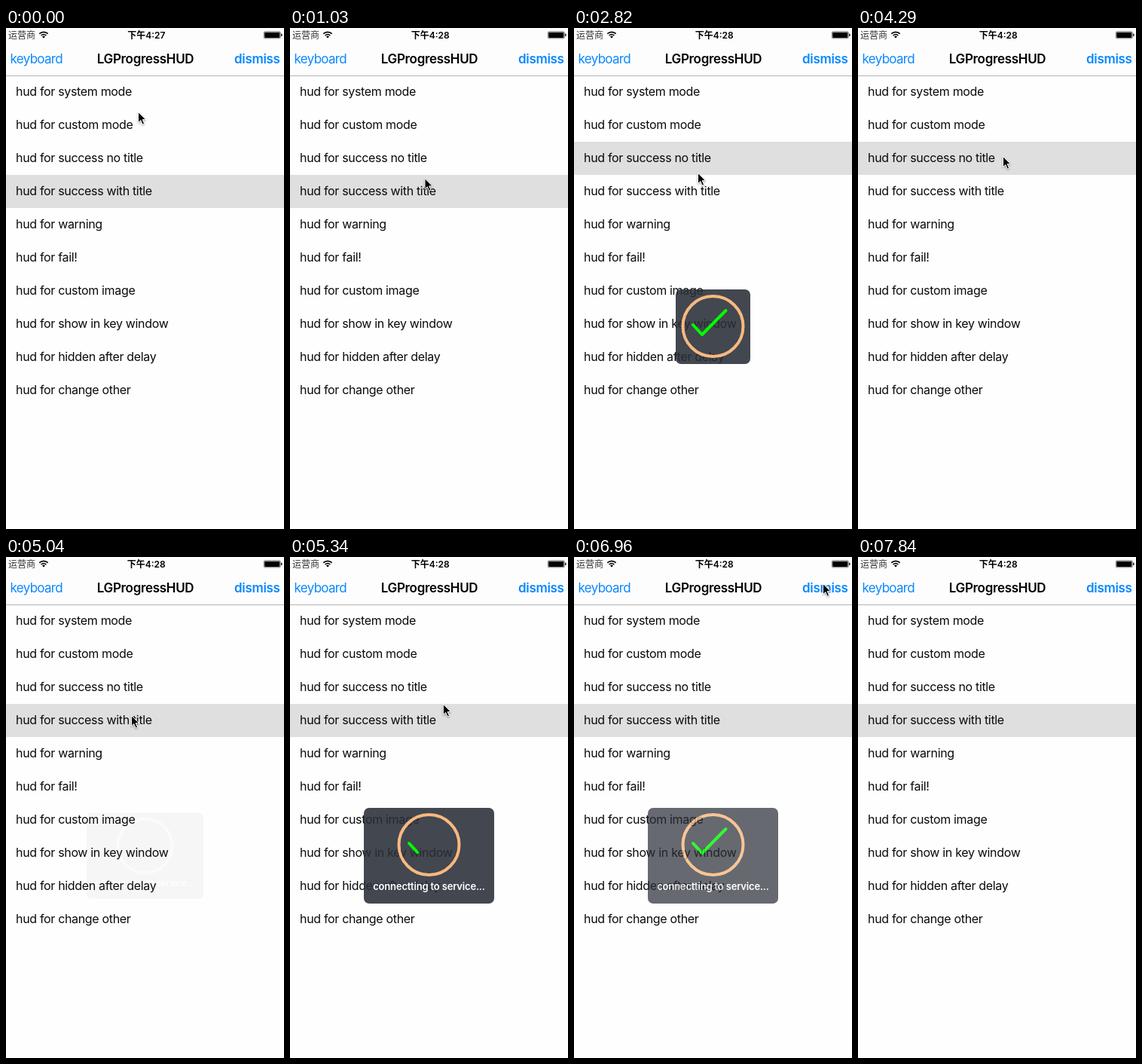
Recreate the animation shown at these times as an HTML page. Size 369 by 665 pixels, loop 7.94 s.

```html
<!DOCTYPE html>
<html lang="zh">
<head>
<meta charset="utf-8">
<title>LGProgressHUD</title>
<style>
  html, body { margin: 0; width: 100%; height: 100%; overflow: hidden; background: #fefefe; }
  svg { display: block; width: 369px; height: 665px; }
  text { font-family: Inter, "Noto Sans CJK SC", "Noto Sans CJK", sans-serif; white-space: pre; }
  .row { font-size: 16px; letter-spacing: -.33px; fill: #0a0a0a; }
  .carrier { font-size: 12px; fill: #333; }
  .clock { font-size: 12px; font-weight: 600; text-anchor: middle; }
  .title { font-size: 17px; font-weight: 600; letter-spacing: -.32px; text-anchor: middle; }
  .link { font-size: 17px; letter-spacing: -.7px; fill: #0b88ff; }
  .bold { font-weight: 600; letter-spacing: -.35px; text-anchor: end; }
  .note { font-size: 13px; font-weight: 600; letter-spacing: -.18px; fill: #fff; text-anchor: middle; }
</style>
</head>
<body>
<svg viewBox="0 0 369 665">
  <rect width="369" height="63" fill="#fdfdfd"/>
  <rect y="63" width="369" height="1" fill="#b4b4b4"/>
  <text class="carrier" x="3" y="13.5">运营商</text>
  <g fill="none" stroke="#000" stroke-width="1.7">
    <path d="M44.3 7.6a8.2 8.2 0 0 1 11.4 0M46.6 10a5 5 0 0 1 6.8 0"/>
    <path d="M50 13.6l-2-2.2a3 3 0 0 1 4 0z" fill="#000" stroke="none"/>
  </g>
  <text class="clock" id="clock" x="186.3" y="13.5"></text>
  <rect x="342.3" y="4.8" width="22" height="9" rx="1.5" fill="none" stroke="#000" stroke-width=".5"/>
  <rect x="343.2" y="5.7" width="20.2" height="7.2" rx=".8"/>
  <rect x="365" y="7.5" width="1.6" height="3.5" rx=".8" fill="#222"/>
  <text class="link" x="5.6" y="47">keyboard</text>
  <text class="title" x="185" y="47">LGProgressHUD</text>
  <text class="link bold" x="363.5" y="47">dismiss</text>

  <rect id="pick" width="369" height="44" fill="#dfdfdf"/>
  <g id="rows"></g>

  <g id="hud">
    <rect id="panel" rx="7" fill="#2a2e37" fill-opacity=".88"/>
    <g id="mark" fill="none" stroke-width="4">
      <circle r="40" stroke="#f7b97f"/>
      <path id="check" d="M-26.5-2L-14.5 11L17-21" pathLength="1" stroke="#0f0"
        stroke-linecap="round" stroke-linejoin="round"/>
    </g>
    <text class="note" id="note" y="45">connectting to service...</text>
  </g>

  <path id="cursor" d="M.5.5V14.6L3.8 11.5L6.2 17L8.6 16L6.2 10.6H10.7Z" stroke="#fff"
    style="filter:drop-shadow(0 1px 1px #0006)"/>
</svg>
<script>
const LOOP = 7940, STEP = 148;
const $ = id => document.getElementById(id);
const set = (id, attrs) => { for (const k in attrs) $(id).setAttribute(k, attrs[k]); };
const clamp = v => Math.min(1, Math.max(0, v));
const smooth = v => { v = clamp(v); return v * v * (3 - 2 * v); };

const modes = ['system mode', 'custom mode', 'success no title', 'success with title', 'warning', 'fail!',
  'custom image', 'show in key window', 'hidden after delay', 'change other'];
$('rows').innerHTML = modes.map((m, i) => `<text class="row" x="13" y="${90 + 44 * i}">hud for ${m}</text>`).join('');

// Pointer stops: [step, x, y]
const stops = [[0, 175, 111], [5, 180, 209], [9, 174, 170], [18, 174, 170], [19, 164, 192], [20, 164, 192],
  [25, 350, 34], [29, 192, 170], [34, 166, 210], [41, 295, 157], [43, 337, 26], [47, 330, 35], [53, 350, 690]];

function pointer(step) {
  const i = Math.max(1, stops.findIndex(s => s[0] >= step));
  const [t0, x0, y0] = stops[i - 1], [t1, x1, y1] = stops[i];
  const u = (step - t0) / (t1 - t0);
  return [x0 + (x1 - x0) * u, y0 + (y1 - y0) * u];
}

const plain = { from: 1560, hide: 3650, w: 99, h: 99, markY: -.5 };
const titled = { from: 5022, hide: 6900, w: 173, h: 127, markY: -14.5, note: true };

// Swings from small to large, then settles at full size
const pop = age => age < 255 ? 1 - .105 * Math.cos(Math.PI * age / 170) : 1;

function drawHud(t) {
  const s = [plain, titled].find(s => t >= s.from && t < s.hide + 300);
  $('hud').style.display = s ? '' : 'none';
  if (!s) return;
  const age = t - s.from, drawn = clamp((age - 150) / 600);
  set('hud', {
    transform: `translate(184.5 396.5) scale(${pop(age)})`,
    opacity: smooth(age / 85) * clamp(1 - (t - s.hide) / 300)
  });
  set('panel', { x: -s.w / 2, y: -s.h / 2, width: s.w, height: s.h });
  set('mark', { transform: `translate(0 ${s.markY})` });
  set('check', { 'stroke-dasharray': `${drawn} 2`, opacity: drawn ? 1 : 0 });
  $('note').style.display = s.note ? '' : 'none';
}

function frame(now) {
  // The picture only changes on whole steps
  const step = Math.floor((now % LOOP + 4) / STEP), t = step * STEP;
  set('cursor', { transform: `translate(${pointer(step)})` });
  set('pick', { y: t > plain.from && t < titled.from ? 151 : 195 });
  $('clock').textContent = step < 4 ? '下午4:27' : '下午4:28';
  drawHud(t);
  requestAnimationFrame(frame);
}
frame(0);
</script>
</body>
</html>
```
